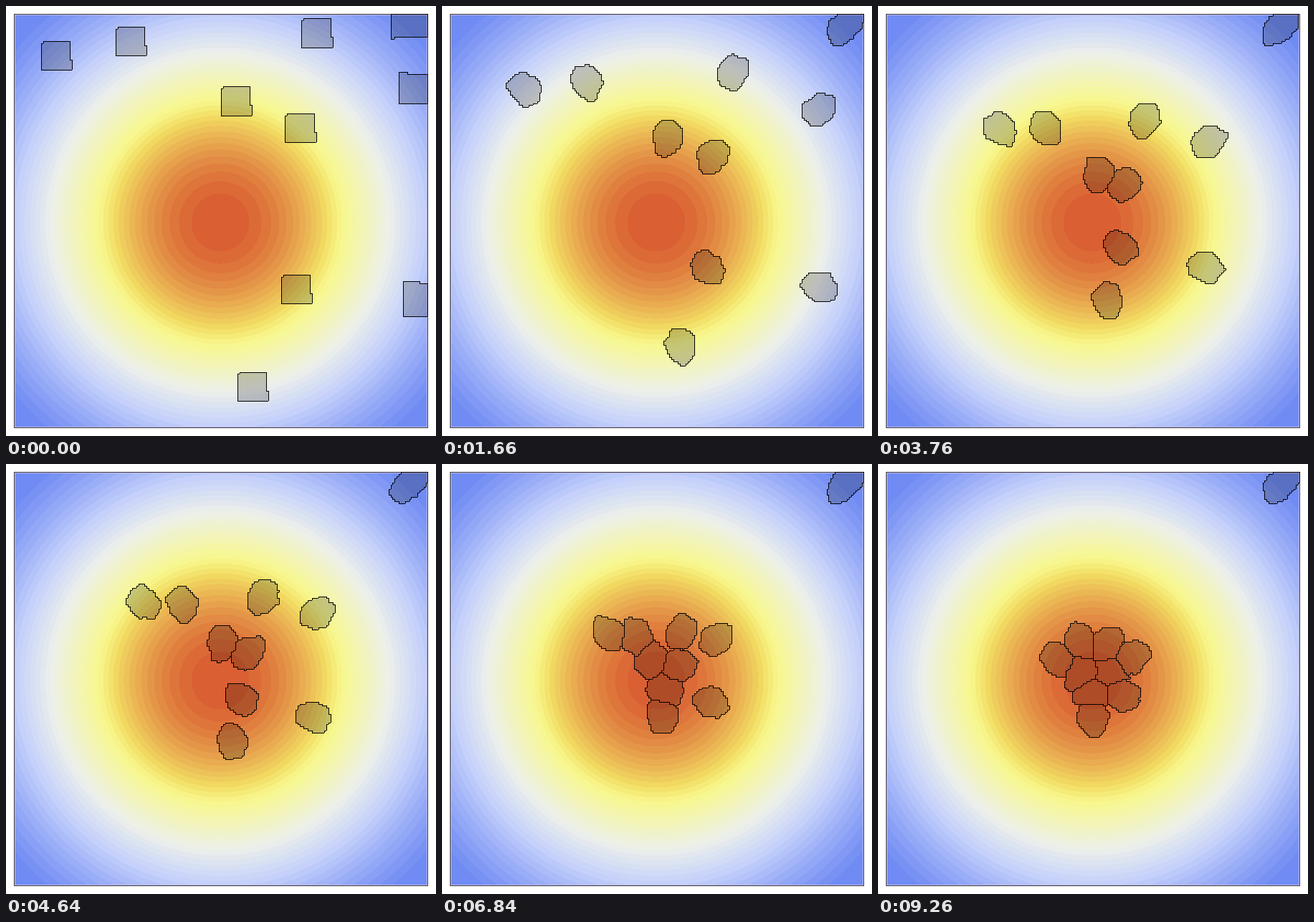
Animation, 600 px wide and 600 px high, one loop 9.28 s. Source, as a matplotlib script:

```python
import numpy as np
import matplotlib.pyplot as plt
from matplotlib.animation import FuncAnimation

SIZE = 600          # stage in pixels
GRID = 200          # lattice sites per side
LEFT, SITE = 11, 2.885
AREA = 200          # lattice sites per cell
STEPS = 200
TICK, LOOP = 20, 9280

# Motion, in lattice sites per step
PEAK = (np.array([298.5, 301.5]) - LEFT) / SITE
SPEED, RANGE = 0.69, 38
GAP, PUSH = 13.5, 0.2
WALL = 9.5

# Starting cells: free ones (column, row), wall ones (column, row, width)
FREE = [(13, 13), (49, 6), (139, 2), (100, 35), (131, 48), (129, 126), (108, 173)]
WALLED = [(188, 130, 12), (186, 29, 14), (182, 0, 18)]
COUNT = len(FREE) + len(WALLED)

# Field colours from low to high concentration
STOPS = [
    (0.17, 112, 140, 244), (0.37, 197, 209, 251), (0.50, 237, 240, 235),
    (0.70, 248, 248, 142), (0.76, 243, 222, 100), (0.99, 218, 96, 51),
]

rng = np.random.default_rng(7)
WAVES = np.arange(3, 10)
PHASE = rng.uniform(0, 2 * np.pi, (COUNT, len(WAVES)))
DRIFT = rng.normal(0, 0.3, PHASE.shape)


def field():
    """Banded Gaussian concentration on white, with a thin frame."""
    y, x = np.mgrid[:SIZE, :SIZE]
    u = np.exp(-((x - 298.5) ** 2 + (y - 301.5) ** 2) / 81200)
    band = (np.floor(u * 50) + 0.5) / 50
    level, *rgb = np.array(STOPS).T
    img = np.dstack([np.interp(band, level, c) for c in rgb])
    for inset, color in ((LEFT + 1, (190, 185, 235)), (LEFT, (60, 60, 66))):
        for k in (inset, SIZE - 1 - inset):
            img[k, :] = color
            img[:, k] = color
    margin = (np.minimum(x, y) < LEFT) | (np.maximum(x, y) > SIZE - 1 - LEFT)
    img[margin] = 255
    return img


def start_labels():
    """Blocks of AREA sites; the remainder of a block forms a small step."""
    labels = np.zeros((GRID, GRID), np.uint8)
    for i, (c, r) in enumerate(FREE, 1):
        labels[r:r + 14, c:c + 14] = i
        labels[r, c] = 0
        labels[r + 9:r + 14, c + 14] = i
    for i, (c, r, w) in enumerate(WALLED, len(FREE) + 1):
        h, rest = divmod(AREA, w)
        labels[r:r + h, c:c + w] = i
        labels[r - 1 if r else h, c:c + rest] = i
    return labels


def walls_touched(pos):
    return (np.minimum(pos, GRID - pos) < WALL).sum(axis=1)


def simulate():
    """Cells climb towards the peak, stick to walls and push each other apart."""
    pos = np.array([np.argwhere(START == i)[:, ::-1].mean(axis=0) + 0.5
                    for i in range(1, COUNT + 1)])
    track = [pos]
    for _ in range(STEPS - 1):
        to_peak = PEAK - pos
        r = np.linalg.norm(to_peak, axis=1) + 1e-6
        grip = np.clip(1 - 0.6 * walls_touched(pos), 0, 1)
        pull = SPEED * grip * (1 - np.exp(-r / RANGE)) / r
        apart = pos[:, None] - pos[None]
        d = np.linalg.norm(apart, axis=2) + np.eye(COUNT)
        push = PUSH * np.clip(GAP - d, 0, None) / d
        pos = pos + to_peak * pull[:, None] + (apart * push[..., None]).sum(axis=1)
        track.append(pos)
    return np.array(track)


def cell_labels(step):
    """Each cell holds the closest sites of its own territory."""
    if step == 0:
        return START
    pos = TRACK[step]
    owner = np.zeros((GRID, GRID), np.uint8)
    best = np.full((GRID, GRID), 12.0)
    soft = min(step / 6, 1)
    stretch = 0.1 + 0.07 * walls_touched(pos)
    for i, (cx, cy) in enumerate(pos - 0.5):
        r0, c0 = max(int(cy) - 18, 0), max(int(cx) - 18, 0)
        patch = np.s_[r0:min(r0 + 38, GRID), c0:min(c0 + 38, GRID)]
        rows, cols = np.mgrid[patch]
        dx, dy = cols - cx, rows - cy
        theta = np.arctan2(dy, dx)

        # Long axis points at the peak, outline ripples
        gx, gy = PEAK - pos[i]
        axis = np.arctan2(gy, gx)
        bulge = stretch[i] * min(np.hypot(gx, gy) / 15, 1) * np.cos(2 * (theta - axis))
        for k, p, w in zip(WAVES, PHASE[i], DRIFT[i]):
            bulge = bulge + 0.12 / k * np.cos(k * theta + p + w * step)

        block = 1.13 * np.maximum(abs(dx), abs(dy))
        dist = (soft * np.hypot(dx, dy) + (1 - soft) * block) * (1 - soft * bulge)
        near = dist < best[patch]
        best[patch][near] = dist[near]
        owner[patch][near] = i + 1

    labels = np.zeros_like(owner)
    for i in range(1, COUNT + 1):
        sites = np.flatnonzero(owner == i)
        order = np.argsort(best.flat[sites])
        labels.flat[sites[order[:AREA]]] = i
    return labels


def render(step):
    """Shade the cells and outline every change of label."""
    labels = np.pad(cell_labels(step), 1)[np.ix_(LOOKUP, LOOKUP)]
    img = BACK.copy()
    inside = labels > 0
    img[inside] = SHADE[inside]
    edge = np.zeros(labels.shape, bool)
    edge[1:] |= labels[1:] != labels[:-1]
    edge[:, 1:] |= labels[:, 1:] != labels[:, :-1]
    img[edge] = 0
    return img


def step_at(ms):
    """Steps are held for 20, 100 and 20 ms in turn."""
    cycle, rest = divmod(ms, 140)
    return min(3 * cycle + (rest >= 20) + (rest >= 120), STEPS - 1)


START = start_labels()
TRACK = simulate()
# Lattice index of every pixel; the outer ring of the padded lattice is empty
LOOKUP = np.floor((np.arange(SIZE) + 0.02 - LEFT) / SITE).astype(int)
LOOKUP = np.clip(LOOKUP, -1, GRID) + 1
base = field()
BACK = base.astype(np.uint8)
SHADE = (base * 0.8).astype(np.uint8)

fig = plt.figure(figsize=(6, 6), dpi=100, facecolor="white")
ax = fig.add_axes([0, 0, 1, 1])
ax.axis("off")
picture = ax.imshow(render(0), interpolation="nearest", aspect="auto")


def update(frame):
    picture.set_data(render(step_at(frame * TICK)))
    return [picture]


anim = FuncAnimation(fig, update, frames=LOOP // TICK, interval=TICK,
                     repeat=True, repeat_delay=0)
plt.show()
```
